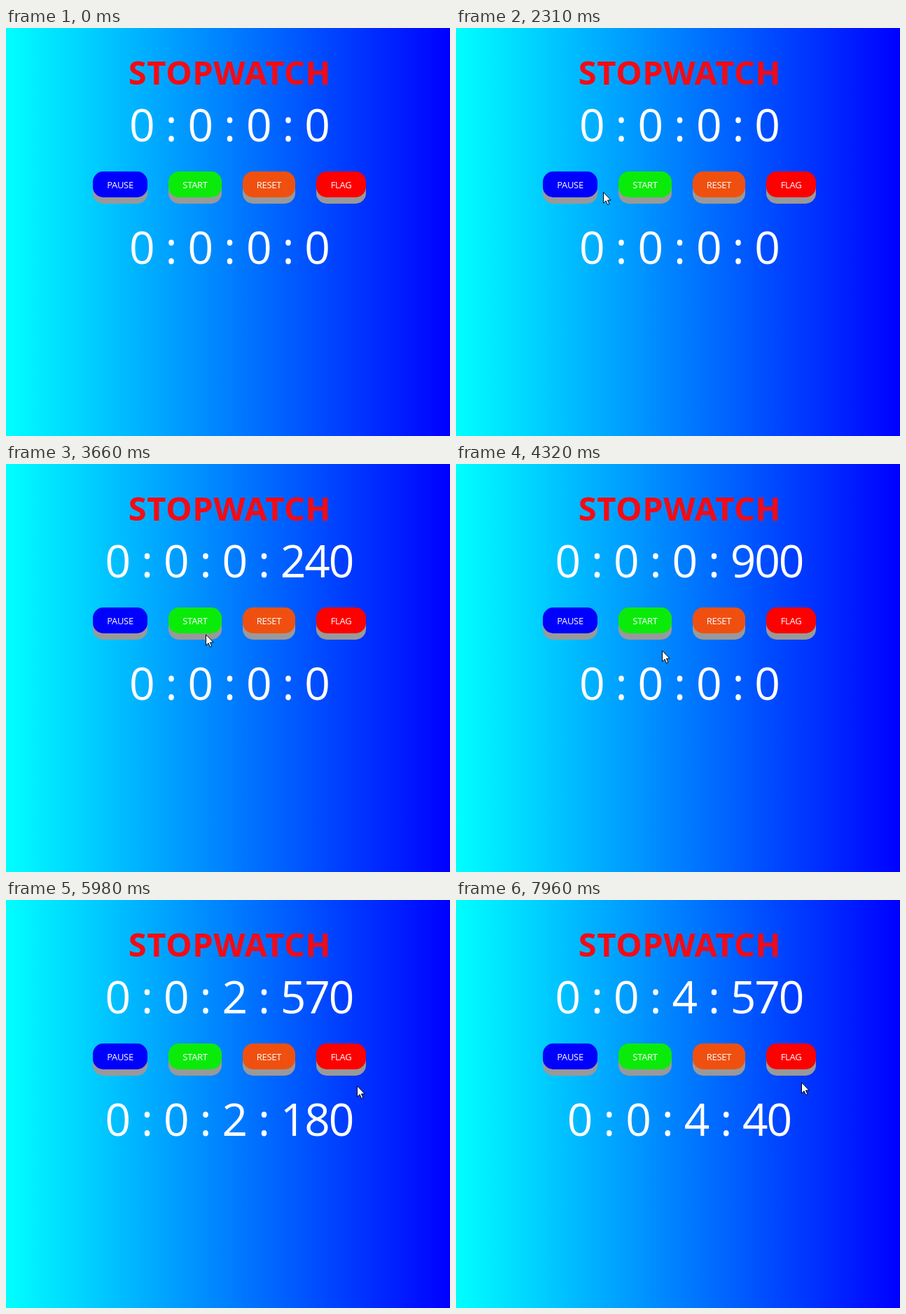
An HTML page that plays this animation: 634 px wide and 583 px high, repeating every 8000 ms.

```html
<!DOCTYPE html>
<html lang="en">
<head>
<meta charset="utf-8">
<title>Stopwatch</title>
<style>
  html, body { margin: 0; width: 100%; height: 100%; overflow: hidden; }
  body { background: linear-gradient(to right, #00ffff, #0000ff); }
  svg { display: block; width: 634px; height: 583px; font-family: "Open Sans", "Noto Sans", sans-serif; }
  text { fill: #fff; text-anchor: middle; white-space: pre; }
  .title { font-size: 47px; font-weight: 700; letter-spacing: .6px; fill: #f50a14; }
  .time { font-size: 64px; letter-spacing: -2.1px; word-spacing: 2.5px; }
  .label { font-size: 13px; letter-spacing: -.3px; }
</style>
</head>
<body>
<svg viewBox="0 0 634 583">
  <text class="title" x="319.5" y="81">STOPWATCH</text>
  <text class="time" id="clock" x="318.4" y="162"></text>
  <g id="buttons"></g>
  <text class="time" id="lap" x="318.4" y="337"></text>
  <path id="cursor" d="M.5 .8V16.2L4.1 12.9L6.5 18.5L8.9 17.5L6.5 12H11.3Z" fill="#fff" stroke="#000" stroke-linejoin="round"/>
</svg>
<script>
const LOOP = 8000, APPEAR = 660, RUN = 3655;  // ms
const TOP = 205, HEIGHT = 37, GAP = 30;
const RUN_TICK = 9;
const $ = id => document.getElementById(id);

const buttons = [
  { name: "PAUSE", width: 78, color: "#0000ff", hover: "#00008b" },
  { name: "START", width: 76, color: "#0aeb0a", hover: "#006400" },
  { name: "RESET", width: 75, color: "#f0500f", hover: "#f0500f" },
  { name: "FLAG", width: 71, color: "#ff0000", hover: "#8b0000" }
];
let left = 124;
for (const b of buttons) {
  b.x = left;
  left += b.width + GAP;
}

$("buttons").innerHTML = buttons.map(({ name, x, width, color }) => `
  <rect x="${x}" y="${TOP + 9}" width="${width}" height="${HEIGHT}" rx="15" fill="#999"/>
  <rect id="${name}" x="${x}" y="${TOP}" width="${width}" height="${HEIGHT}" rx="15" fill="${color}"/>
  <text class="label" x="${x + width / 2}" y="229">${name}</text>`).join("");

// Pointer turning points: tick, x, y. It moves straight between them.
const path = [
  [0, 615, 377], [2, 495, 238], [5, 210, 234], [6, 183, 239], [7, 274, 257],
  [8, 281, 232], [11, 294, 266], [13, 470, 242], [14, 472, 231], [15, 472, 231],
  [16, 501, 265], [18, 501, 265], [19, 477, 232], [20, 486, 236], [22, 493, 260]
];

function pointer(tick) {
  const next = path.findIndex(p => p[0] >= tick);
  const [t1, x1, y1] = path[next];
  const [t0, x0, y0] = path[Math.max(next - 1, 0)];
  const k = t1 > t0 ? (tick - t0) / (t1 - t0) : 1;
  return [Math.round(x0 + (x1 - x0) * k), Math.round(y0 + (y1 - y0) * k)];
}

// The screen refreshes about three times a second.
const tickAt = t => t < RUN
  ? Math.min(RUN_TICK - 1, Math.floor((t - APPEAR) / 330))
  : RUN_TICK + Math.floor((t - RUN) / 331);

const elapsed = tick => tick < RUN_TICK ? 0 : 240 + Math.floor((tick - RUN_TICK) * 100 / 3) * 10;
const lapTime = tick => tick < 15 ? 0 : tick < 21 ? 2180 : 4040;
const format = ms => `0 : 0 : ${Math.floor(ms / 1000)} : ${ms % 1000}`;

function draw(t) {
  const tick = tickAt(t);
  const [x, y] = pointer(tick);
  const inRow = tick >= 0 && y >= TOP && y < TOP + HEIGHT;
  $("clock").textContent = format(elapsed(tick));
  $("lap").textContent = format(lapTime(tick));
  for (const b of buttons) {
    const over = inRow && x >= b.x && x < b.x + b.width;
    $(b.name).setAttribute("fill", over ? b.hover : b.color);
  }
  $("cursor").setAttribute("visibility", tick < 0 ? "hidden" : "visible");
  $("cursor").setAttribute("transform", `translate(${x} ${y})`);
}

const start = performance.now();
function frame() {
  draw((performance.now() - start) % LOOP);
  requestAnimationFrame(frame);
}
frame();
</script>
</body>
</html>
```
